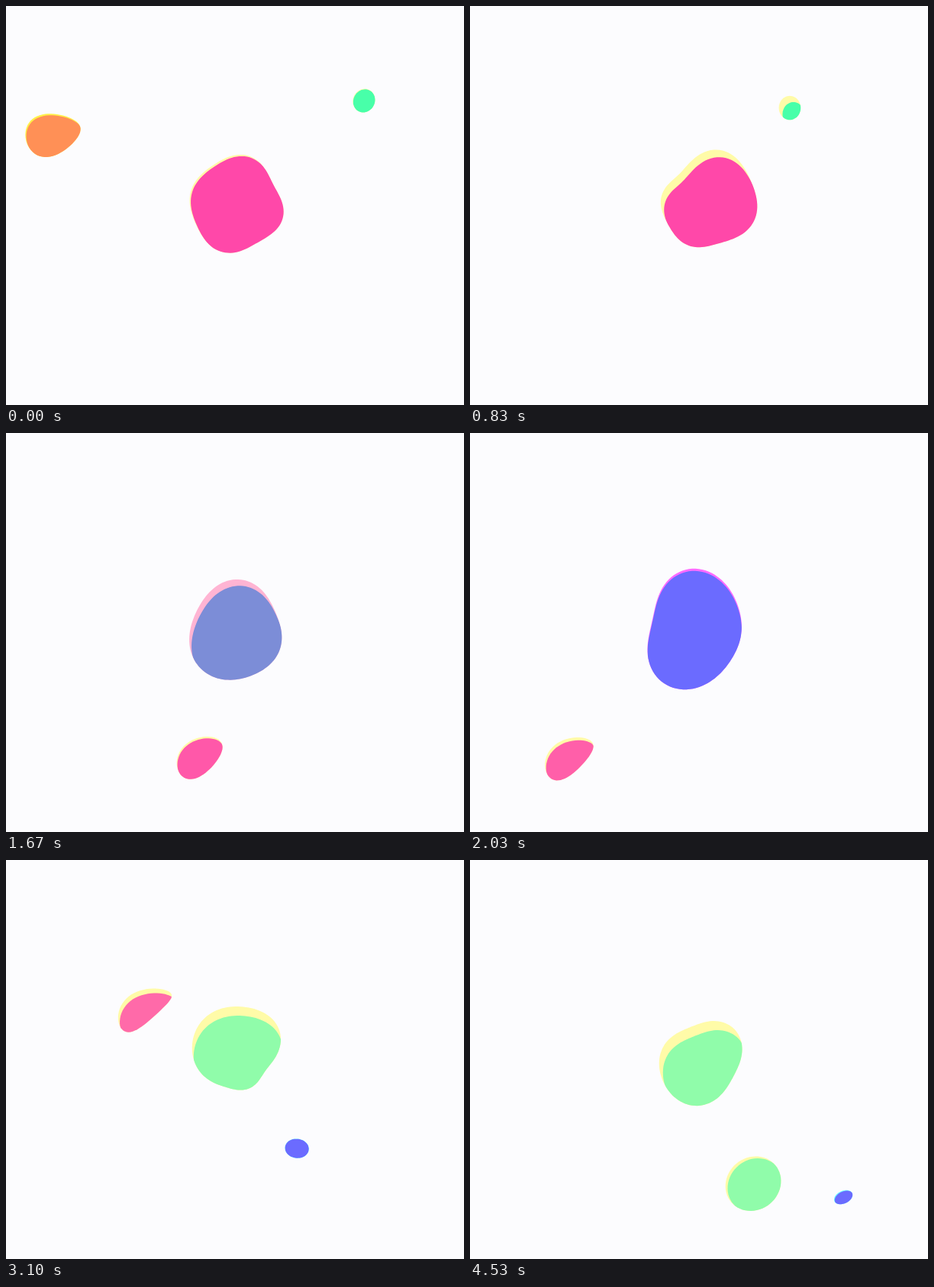
Write an HTML page that moves like this. It is 600 by 523 pixels and loops after 4560 ms.

```html
<!DOCTYPE html>
<html lang="en">
<head>
<meta charset="utf-8">
<title>Blobs</title>
<style>
html, body { margin: 0; width: 100%; height: 100%; overflow: hidden; background: #fcfcfe; }
svg { display: block; width: 100%; height: 100%; }
</style>
</head>
<body>
<svg id="stage" viewBox="0 0 600 523"></svg>
<script>
const LOOP = 4560, CX = 304, CY = 260, TAU = Math.PI * 2;
const NS = 'http://www.w3.org/2000/svg';
const stage = document.getElementById('stage');

const YELLOW = [255, 251, 168], ORANGE = [255, 144, 86], PINK = [255, 72, 169], MAGENTA = [255, 107, 255];
const BLUE = [107, 107, 255], CYAN = [107, 255, 255], MINT = [72, 255, 169], GREEN = [144, 252, 170];

// Core wobble: time, radius, then waves round the rim: lean x y, oval x y, triangle x y, square.
const wobble = [
  [0, 60.9, -3.2, 0, -1.4, 0, .8, 1.4, 3],
  [830, 61, 10.4, -4.2, .8, -3.9, -1.3, 1.3, 3.2],
  [1300, 55.1, 7.4, 1, 3.7, 1.3, -3.3, 2.7, 1.6],
  [2030, 68.4, -12.3, -2.3, -8.1, -3.9, 3.9, 2.5, -.5],
  [3100, 54.6, -3.6, -15.7, -.7, -1.3, -1.6, -2.4, -1.4],
  [3830, 65.7, -9.9, 7.8, 2.9, -4, 1.1, 1.2, 2.7],
  [4530, 53.6, -1.5, 5, -.3, -5.6, -.9, -2.5, .3]
];
const coreFill = [
  [0, ...PINK], [1130, ...PINK], [1300, 143, 180, 170], [2000, ...BLUE], [2700, ...BLUE], [3100, ...GREEN]
];
const coreGlow = [[1450, ...YELLOW], [1900, ...MAGENTA], [2600, ...MAGENTA], [2900, ...YELLOW]];
const coreShift = [[0, 1.5, 2], [1300, 6, 14], [2030, 0, 3], [3100, 2, 12], [3830, 5, 12]];

// Paired values run from first to last over a drop's life; glint is start, end and peak shift.
const drops = [
  { fill: [ORANGE, ORANGE], glow: [255, 240, 72], glint: [-150, 1000, 3, 5],
    path: [[0, 61.5, 167.5], [560, 238, 222], [740, 300, 256]],
    size: [31.5, 31.5], stretch: [1.35, 1], turn: [-14, 0], taper: [.28, 0] },
  { fill: [MINT, MINT], glow: YELLOW, glint: [-60, 2100, 5, 8.5],
    path: [[0, 469, 124], [830, 419, 133.5], [1300, 368.5, 168], [1750, 314, 240]],
    size: [15, 15], stretch: [1.1, 1.1], turn: [-65, -100] },
  { fill: [PINK, [255, 107, 169]], glow: YELLOW, glint: [1200, 5000, 2.2, 6],
    path: [[960, 308, 270], [1300, 338.5, 365], [1600, 276, 419], [2030, 130, 425.5],
      [2400, 72, 334], [3100, 181, 194.5], [3620, 290, 245]],
    size: [27, 28.5], stretch: [1.1, 2], turn: [-45, -34], taper: [0, .25], bend: [0, 4] },
  { fill: [BLUE, BLUE], glow: CYAN, glint: [3100, 4600, 6, 5],
    path: [[2640, 315, 270], [3100, 381, 378], [3830, 459.5, 415.5], [4530, 489, 442]],
    size: [17, 10.3], stretch: [1, 1.55], turn: [30, -25] },
  { fill: [GREEN, GREEN], glow: YELLOW, glint: [3640, 5100, 3, 2.7],
    path: [[3640, 318, 270], [3830, 353, 273], [4530, 371, 424]],
    size: [20, 36], stretch: [1.05, 1.1], turn: [-35, -40] }
];

const clamp = v => Math.min(1, Math.max(0, v));
const lerp = (a, b, k) => a + (b - a) * k;
const mix = (a, b, k) => a.map((v, i) => lerp(v, b[i], k));
const rgb = c => `rgb(${c.map(Math.round)})`;

function segment(keys, t) {
  let i = 0;
  while (i < keys.length - 2 && t >= keys[i + 1][0]) i++;
  return i;
}

function linear(keys, t) {
  const i = segment(keys, t), a = keys[i], b = keys[i + 1];
  return mix(a.slice(1), b.slice(1), clamp((t - a[0]) / (b[0] - a[0])));
}

// Cubic interpolation through unevenly spaced keys.
function smooth(keys, t) {
  const i = segment(keys, t), a = keys[i], b = keys[i + 1];
  const p = keys[i - 1] || a, n = keys[i + 2] || b, span = b[0] - a[0];
  const u = Math.min(1.1, (t - a[0]) / span), w = 1 - u;
  return a.slice(1).map((v, j) => {
    const e = b[j + 1];
    const m0 = (e - p[j + 1]) / (b[0] - p[0]) * span;
    const m1 = (n[j + 1] - v) / (n[0] - a[0]) * span;
    return v * (1 + 2 * u) * w * w + m0 * u * w * w + e * u * u * (3 - 2 * u) - m1 * u * u * w;
  });
}

const wave = (x, y, a) => x * Math.cos(a) + y * Math.sin(a);

function rim([r, lx, ly, ox, oy, tx, ty, square]) {
  return a => r + wave(lx, ly, a) + wave(ox, oy, 2 * a) + wave(tx, ty, 3 * a) + square * Math.cos(4 * a - 1.13);
}

const polar = (x, y, r, a) => [x + r * Math.cos(a), y + r * Math.sin(a)];
const xy = p => p[0].toFixed(2) + ' ' + p[1].toFixed(2);

function outline(count, point) {
  let d = '';
  for (let i = 0; i < count; i++) d += (i ? 'L' : 'M') + xy(point(i / count * TAU));
  return d + 'Z';
}

function dropPath(drop, x, y, age) {
  const now = ([a, b] = [0, 0]) => lerp(a, b, age);
  const root = Math.sqrt(now(drop.stretch)), a = now(drop.size) * root, b = now(drop.size) / root;
  const turn = now(drop.turn) * TAU / 360, c = Math.cos(turn), s = Math.sin(turn);
  const taper = now(drop.taper), bend = now(drop.bend);
  return outline(60, q => {
    const k = Math.cos(q);
    const u = a * k, v = b * Math.sin(q) * (1 - taper * k) + bend * (2 * k * k - 1);
    return [x + u * c - v * s, y + u * s + v * c];
  });
}

// Sticky bridge between the core and a drop close to it.
function neck(radius, x, y, r, gap) {
  const dx = x - CX, dy = y - CY, d = Math.hypot(dx, dy), dir = Math.atan2(dy, dx);
  const R = radius(dir);
  if (d <= Math.abs(R - r) + 1) return '';
  const v = .5 * clamp(1 - gap / 14), touch = d < R + r;
  const u1 = touch ? Math.acos((R * R + d * d - r * r) / (2 * R * d)) : 0;
  const u2 = touch ? Math.acos((r * r + d * d - R * R) / (2 * r * d)) : 0;
  const full = Math.acos((R - r) / d);
  const s1 = lerp(u1, full, v), s2 = lerp(Math.PI - u2, full, v);
  const side = k => {
    const a = dir + k * s1, b = dir + k * s2;
    const p = polar(CX, CY, radius(a), a), q = polar(x, y, r, b);
    const len = Math.min(v * 2.4, Math.hypot(p[0] - q[0], p[1] - q[1]) / (R + r)) * Math.min(1, 2 * d / (R + r));
    return [p, polar(...p, R * len, a - k * TAU / 4), polar(...q, r * len, b + k * TAU / 4), q].map(xy);
  };
  const up = side(-1), low = side(1);
  return `M${up[0]}C${up[1]} ${up[2]} ${up[3]}L${low[3]}C${low[2]} ${low[1]} ${low[0]}Z`;
}

function add(parent, tag, attrs = {}) {
  const el = parent.appendChild(document.createElementNS(NS, tag));
  for (const k in attrs) el.setAttribute(k, attrs[k]);
  return el;
}

// A silhouette in the glow colour with a shifted, clipped copy on top.
function makeBlob(id) {
  const clip = add(add(stage, 'clipPath', { id }), 'path');
  const back = add(stage, 'path');
  const front = add(add(stage, 'g', { 'clip-path': `url(#${id})` }), 'path');
  return (d, fill, glow, shift) => {
    for (const el of [clip, back, front]) el.setAttribute('d', d);
    back.setAttribute('fill', rgb(glow));
    front.setAttribute('fill', rgb(fill));
    front.setAttribute('transform', `translate(${shift})`);
  };
}

const paintCore = makeBlob('core');
drops.forEach((drop, i) => drop.paint = makeBlob('drop' + i));

function draw(t) {
  const radius = rim(smooth(wobble, t));
  const fill = linear(coreFill, t), glow = linear(coreGlow, t), shift = linear(coreShift, t);
  let body = outline(120, a => polar(CX, CY, radius(a), a));

  for (const drop of drops) {
    const { path, size, glint: [from, to, gx, gy] } = drop;
    const born = path[0][0], life = (t - born) / (path[path.length - 1][0] - born);
    const age = 1 - (1 - clamp(life)) ** 2;
    let d = '', near = 0;
    if (life >= 0 && life < 1.04) {
      const [x, y] = smooth(path, t), r = lerp(...size, age);
      const gap = Math.hypot(x - CX, y - CY) - radius(Math.atan2(y - CY, x - CX)) - r;
      d = dropPath(drop, x, y, age);
      near = clamp((26 - gap) / 12);
      // Close drops become part of the core's outline.
      if (gap < 14) {
        body += d + neck(radius, x, y, r * .98, gap);
        d = '';
      }
    }
    const shine = Math.sin(clamp((t - from) / (to - from)) * Math.PI);
    drop.paint(d, mix(mix(...drop.fill, age), fill, near), mix(drop.glow, glow, near),
      mix([gx * shine, gy * shine], shift, near));
  }
  paintCore(body, fill, glow, shift);
}

const start = performance.now();
function tick() {
  draw((performance.now() - start) % LOOP);
  requestAnimationFrame(tick);
}
draw(0);
requestAnimationFrame(tick);
</script>
</body>
</html>
```
